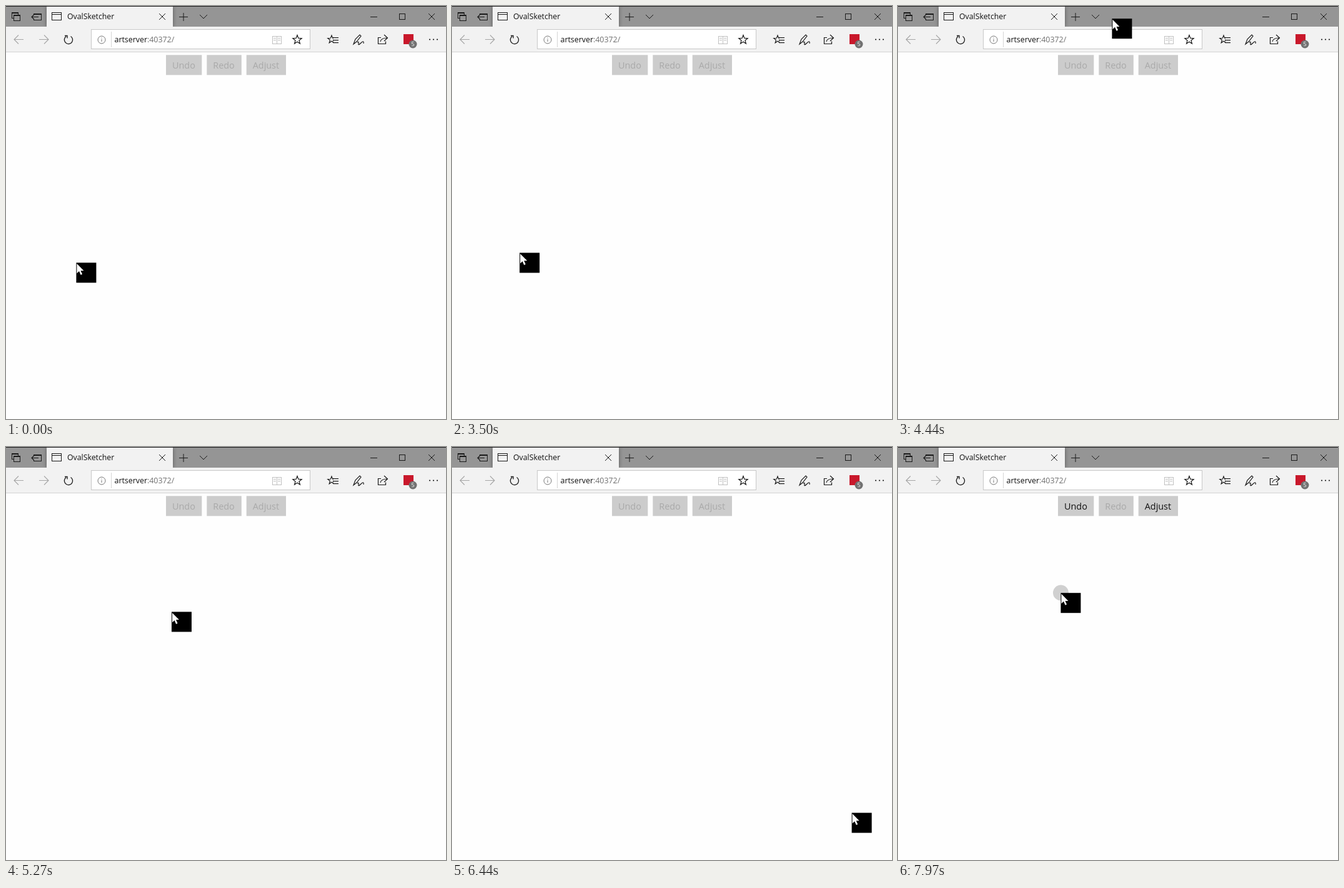
An HTML page with a canvas that plays this animation: 704 px wide and 660 px high, repeating every 8000 ms.

```html
<!DOCTYPE html>
<html lang="en">
<head>
<meta charset="utf-8">
<title>Oval sketcher</title>
<style>
  html, body { margin: 0; width: 100%; height: 100%; overflow: hidden; background: #fefefe; }
  canvas { display: block; }
</style>
</head>
<body>
<canvas id="stage" width="704" height="660"></canvas>
<script>
const ctx = document.getElementById('stage').getContext('2d');
const FONT = '"Open Sans", "Noto Sans", sans-serif';
const INK = '#1a1a1a';
const BAR = '#959595';
const PANEL = '#f2f2f2';
const LOOP = 8000;
const DRAW_AT = 7810;
const TAU = Math.PI * 2;

const easeIn = k => k * k;
const easeOut = k => 1 - easeIn(1 - k);
const smooth = k => k * k * (3 - 2 * k);
const linear = k => k;

// Each move starts where the previous one ended; sag bows it downwards.
const move = (from, to, x, y, ease = smooth, sag = 0) => ({ from, to, x, y, ease, sag });
const home = { x: 112, y: 410 };
const moves = [
  move(140, 530, 107, 396),
  move(3480, 3770, 247, 50, easeIn),
  move(3770, 4170, 348, 21, easeOut),
  move(4310, 4440, 342, 20),
  move(5110, 5310, 256, 290),
  move(5510, 5640, 257, 291),
  move(5910, 6240, 674, 575.6, easeIn),
  move(6240, 6440, 642, 587, linear, 50),
  move(6440, 6710, 260, 233, easeOut)
];

function pointerAt(t) {
  let { x, y } = home;
  for (const m of moves) {
    if (t < m.from) break;
    const k = Math.min(1, (t - m.from) / (m.to - m.from));
    const e = m.ease(k);
    x += (m.x - x) * e;
    y += (m.y - y) * e + m.sag * Math.sin(Math.PI * k);
  }
  return [x, y];
}

function fill(color, x, y, w, h) {
  ctx.fillStyle = color;
  ctx.fillRect(x, y, w, h);
}

function box(x, y, w, h, color = INK) {
  ctx.strokeStyle = color;
  ctx.lineWidth = 1;
  ctx.strokeRect(x + 0.5, y + 0.5, w - 1, h - 1);
}

function stroke(d, color = INK, width = 1) {
  ctx.strokeStyle = color;
  ctx.lineWidth = width;
  ctx.stroke(new Path2D(d));
}

function arc(x, y, r, color, from = 0, to = TAU, width = 1) {
  ctx.strokeStyle = color;
  ctx.lineWidth = width;
  ctx.beginPath();
  ctx.arc(x, y, r, from, to);
  ctx.stroke();
}

function disc(color, x, y, r) {
  ctx.fillStyle = color;
  ctx.beginPath();
  ctx.arc(x, y, r, 0, TAU);
  ctx.fill();
}

function text(str, x, y, size, color) {
  ctx.font = `${size}px ${FONT}`;
  ctx.fillStyle = color;
  ctx.fillText(str, x, y);
  return ctx.measureText(str).width;
}

function pane(x, y, w, h, head) {
  box(x, y, w, h);
  fill(INK, x, y, w, head);
}

function cross(x, y, r) {
  stroke(`M${x - r} ${y - r}l${2 * r} ${2 * r}m0 ${-2 * r}l${-2 * r} ${2 * r}`);
}

function arrow(x, y, length, head, color) {
  const tip = Math.sign(length) * head;
  stroke(`M${x} ${y}h${-length}M${x - tip} ${y - head}L${x} ${y}l${-tip} ${head}`, color, 1.1);
}

function star(x, y, r) {
  ctx.beginPath();
  for (let i = 0; i < 10; i++) {
    const a = i * Math.PI / 5 - Math.PI / 2;
    const d = i % 2 ? r * 0.42 : r;
    ctx.lineTo(x + d * Math.cos(a), y + d * Math.sin(a));
  }
  ctx.closePath();
  ctx.strokeStyle = INK;
  ctx.lineWidth = 1.2;
  ctx.stroke();
}

function drawTitleBar() {
  fill(BAR, 0, 0, 704, 33);
  ctx.save();
  ctx.shadowColor = 'rgba(0, 0, 0, 0.4)';
  ctx.shadowBlur = 6;
  fill(PANEL, 65, 1, 202, 33);
  ctx.restore();
  fill(INK, 0, 0, 704, 1);

  pane(9, 10, 11, 10, 2);
  fill(BAR, 12, 14, 11, 10);
  pane(12, 14, 11, 10, 2);

  pane(44, 12, 13, 11, 2);
  fill(BAR, 44, 15, 1, 5);
  arrow(41, 17.5, -11, 3, INK);

  box(73, 10, 16, 13);
  fill(INK, 74, 13, 14, 1);
  text('OvalSketcher', 98, 21, 12.3, '#111');
  cross(250, 17, 5);

  stroke('M277 17.5h14M284 11v13');
  stroke('M310 14l6 6l6 -6');
  fill(INK, 583, 17, 11, 1);
  box(629, 12, 10, 10);
  cross(681, 17, 5);
}

function drawAddressField() {
  fill('#fff', 137, 38, 350, 31);
  box(136, 37, 351, 32, '#c8c8c8');
  fill('#d5d5d5', 168, 41, 1, 25);
  arc(153, 54, 6, '#777');
  fill('#777', 152.5, 53, 1, 4);
  fill('#777', 152.5, 50.5, 1, 1.2);
  const w = text('artserver', 173.5, 58, 12.4, '#111');
  text(':40372/', 173.5 + w, 58, 12.4, '#707070');

  for (const x of [426, 433]) {
    box(x, 48, 8, 13, '#c0c0c0');
    for (const y of [51, 54]) fill('#c0c0c0', x + 2, y, 4, 1);
  }
  star(466, 54, 7.5);
}

function drawToolbar() {
  fill(PANEL, 0, 33, 704, 40);
  fill('#d3d3d3', 0, 73, 704, 1);
  arrow(13, 53.5, -15, 7, '#a6a6a6');
  arrow(68, 53.5, 15, 7, '#a6a6a6');
  arc(100, 54, 6.6, INK, -1, 4.1, 1.3);
  stroke('M94 47.5h4v4', INK, 1.3);
  drawAddressField();

  star(521, 53.5, 6.5);
  fill(PANEL, 524, 49, 8, 11);
  for (const y of [50, 54, 58]) fill(INK, 523, y, 9, 1.2);

  stroke('M556 61L559 53L566 46L568 48L561 57ZM562 58q3 -2 2 2t4 -1t4 1', INK, 1.2);

  stroke('M600 50.5h-4.5v10h12v-4', INK, 1.2);
  stroke('M599 57q1 -6 11 -6M605 46l5.5 5l-5.5 5', INK, 1.2);

  fill('#c9182b', 636, 45, 16, 16);
  disc('#717171', 651, 61, 6.5);
  text('5', 648.4, 64.3, 9, '#fff');
  for (let i = 0; i < 3; i++) disc(INK, 678 + i * 6, 53.5, 1.1);
}

function drawButton(label, x, w, enabled) {
  fill('#ccc', x, 78.3, w, 32);
  text(label, x + 10, 100, 14.4, enabled ? '#111' : '#a9a9a9');
}

function drawPointer(x, y) {
  ctx.save();
  ctx.translate(x + 0.4, y + 0.2);
  fill('#000', 0, 0, 32, 32);
  ctx.fillStyle = '#fff';
  ctx.fill(new Path2D('M1 1.5V17L4.6 13.6L7.2 19.5L9.6 18.4L7.1 12.7H12Z'));
  ctx.restore();
}

function render(t) {
  const drawn = t >= DRAW_AT;
  fill('#fefefe', 0, 0, 704, 660);
  drawTitleBar();
  drawToolbar();
  drawButton('Undo', 256, 57.3, drawn);
  drawButton('Redo', 321.3, 55.5, false);
  drawButton('Adjust', 384.7, 63.3, drawn);
  if (drawn) disc('#d0d0d0', 260.5, 233, 12.5);
  drawPointer(...pointerAt(t));
}

const start = performance.now();
function tick() {
  render((performance.now() - start) % LOOP);
  requestAnimationFrame(tick);
}
tick();
</script>
</body>
</html>
```
